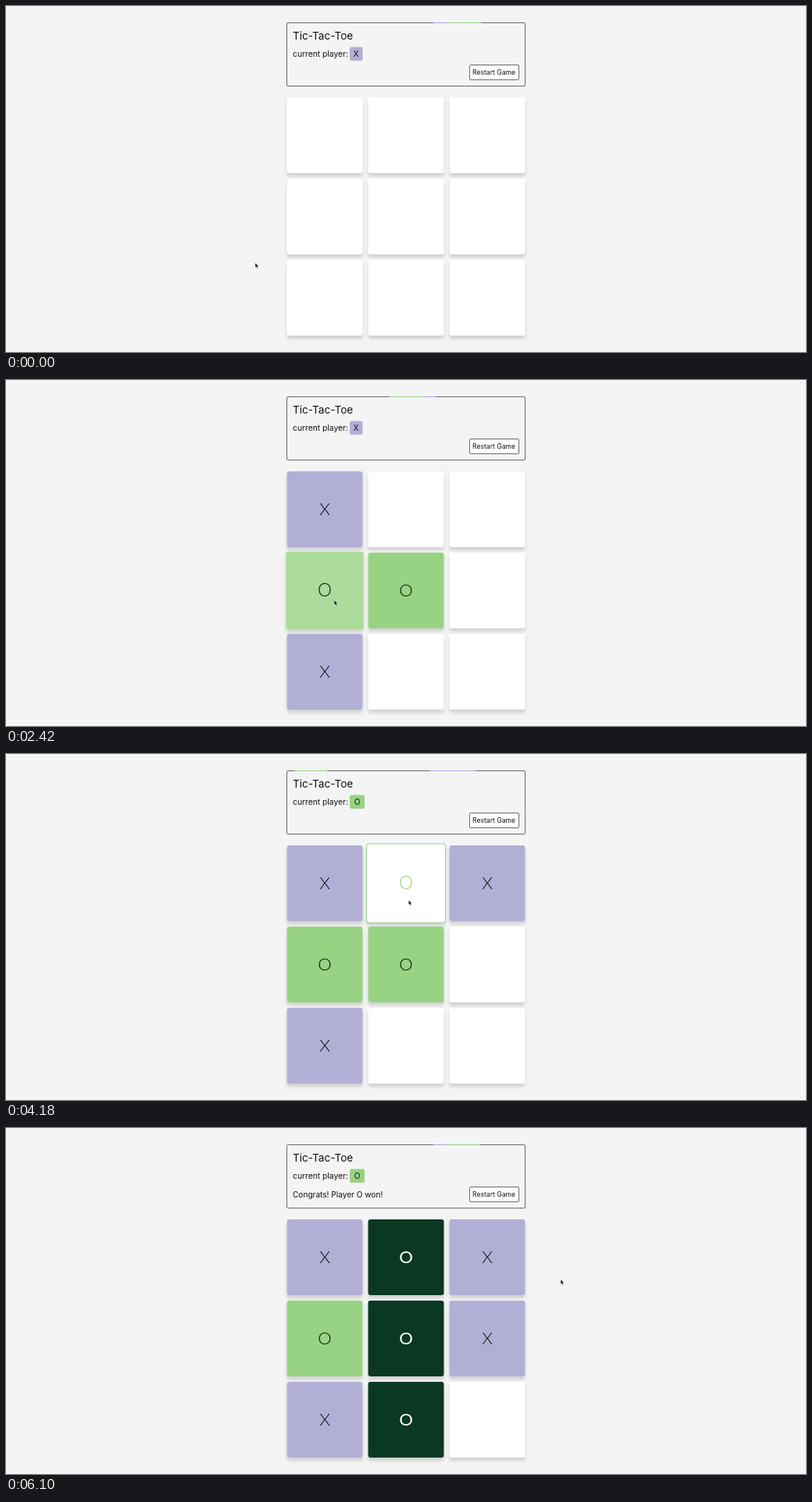
Write an HTML page that moves like this. It is 1024 by 443 pixels and loops after 6.12 s.

```html
<!DOCTYPE html>
<html lang="en">
<head>
<meta charset="utf-8">
<title>Tic-Tac-Toe</title>
<style>
html, body { margin: 0; width: 100%; height: 100%; overflow: hidden; background: #f4f4f4; }
svg { display: block; width: 100%; height: 100%; }
text { font-family: Inter, "Open Sans", sans-serif; fill: #111; }
.panel { fill: none; stroke: #6b6b6b; }
.button { fill: #fff; stroke: #6b6b6b; }
.base { filter: drop-shadow(0 4px 2px rgba(0, 0, 0, .15)); }
.mark { font-family: Lato, sans-serif; font-size: 22px; font-weight: 300; text-anchor: middle; }
</style>
</head>
<body>
<svg viewBox="0 0 1024 443">
  <rect class="panel" x="359.5" y="21.5" width="305" height="81" rx="1.5"/>
  <rect id="violet" y="21" width="60" height="1" fill="#aaa6e0"/>
  <rect id="lime" y="21" width="42" height="1" fill="#97d383"/>
  <text x="367" y="43" font-size="13.6">Tic-Tac-Toe</text>
  <text x="367" y="65" font-size="10.3">current player:</text>
  <rect id="badge" x="440" y="52.5" height="17.5" rx="2"/>
  <text id="player" y="65" font-size="10" text-anchor="middle"></text>
  <text id="message" x="367" y="89" font-size="10.1">Congrats! Player O won!</text>
  <rect class="button" x="593.5" y="75.5" width="63" height="19" rx="1.5"/>
  <text x="597" y="88.3" font-size="8.6">Restart Game</text>
  <g id="board"></g>
  <path id="cursor" d="M0 0V6L1.4 4.8L2.4 7L3.5 6.5L2.6 4.3H4.4Z" fill="#111" stroke="#fff" stroke-width=".4"/>
</svg>
<script>
const LOOP = 6120, FADE = 200, SAMPLES = 20, SIZE = 97, PITCH = 104;
const COLORS = { X: '#b2afd6', O: '#97d383' };
const WIN_COLOR = '#0a3823', WIN_COLUMN = 1;

// Stops of the pointer: time, x, y
const STOPS = [
  [40, 319, 329], [500, 398, 195], [1040, 500, 242], [1860, 406, 400], [2350, 406, 270],
  [2640, 500, 350], [2860, 600, 317], [3180, 604, 350], [3560, 606, 185], [3700, 588, 215],
  [4200, 515, 187], [4440, 585, 265], [4660, 602, 326], [5200, 600, 280], [5830, 520, 392],
  [6100, 710, 194]
];
// Each click marks the cell under the pointer; X begins
const CLICKS = [500, 850, 1550, 2350, 3560, 4200, 5200, 5830];
const WIN_TIME = CLICKS[CLICKS.length - 1];

const byId = id => document.getElementById(id);
const set = (node, attrs) => {
  for (const name in attrs) node.setAttribute(name, attrs[name]);
  return node;
};
const add = (parent, tag, attrs) =>
  parent.appendChild(set(document.createElementNS('http://www.w3.org/2000/svg', tag), attrs));
const clamp = value => Math.min(1, Math.max(0, value));
const ease = part => part * part * (3 - 2 * part);

function pointerAt(time) {
  const last = STOPS.length - 1;
  const next = STOPS.findIndex(stop => stop[0] > time);
  const to = STOPS[next < 0 ? last : next];
  const from = STOPS[next < 0 ? last - 1 : Math.max(0, next - 1)];
  const part = ease(clamp((time - from[0]) / (to[0] - from[0] || 1)));
  return [1, 2].map(i => from[i] + (to[i] - from[i]) * part);
}

const inside = (cell, [x, y]) =>
  Math.abs(x - cell.cx) < SIZE / 2 && Math.abs(y - cell.cy) < SIZE / 2;

function makeCell(index) {
  const column = index % 3;
  const cx = 408 + column * PITCH, cy = 165.5 + Math.floor(index / 3) * PITCH;
  const box = { x: -SIZE / 2, y: -SIZE / 2, width: SIZE, height: SIZE, rx: 3 };
  const group = add(byId('board'), 'g', {});
  const turn = CLICKS.findIndex(time => inside({ cx, cy }, pointerAt(time)));
  add(group, 'rect', { ...box, class: 'base', fill: '#fff' });
  return {
    cx, cy, column, group,
    owner: turn % 2 ? 'O' : 'X',
    taken: turn < 0 ? Infinity : CLICKS[turn],
    fill: add(group, 'rect', box),
    edge: add(group, 'rect', { ...box, fill: 'none' }),
    mark: add(group, 'text', { y: 7.5, class: 'mark' })
  };
}
const cells = Array.from({ length: 9 }, (_, index) => makeCell(index));

// Eased share of the last FADE ms during which the empty cell was under the pointer
function hoverAmount(cell, time) {
  let hits = 0;
  for (let i = 0; i < SAMPLES; i++) {
    const moment = time - i * FADE / SAMPLES;
    if (moment < cell.taken && inside(cell, pointerAt(moment))) hits++;
  }
  return ease(hits / SAMPLES);
}

function drawCell(cell, time, player) {
  const taken = time >= cell.taken;
  const won = time >= WIN_TIME && cell.owner === 'O' && cell.column === WIN_COLUMN;
  const hover = hoverAmount(cell, time);
  const owner = taken ? cell.owner : player;
  set(cell.group, { transform: `translate(${cell.cx} ${cell.cy}) scale(${1 + .04 * hover})` });
  set(cell.fill, {
    fill: won ? WIN_COLOR : COLORS[owner],
    opacity: taken ? clamp((time - cell.taken + 40) / 140) : 0
  });
  set(cell.edge, { stroke: COLORS[owner], opacity: taken ? 0 : hover });
  cell.mark.textContent = owner;
  cell.mark.style.fill = won ? '#fff' : taken ? '#111' : COLORS[owner];
  cell.mark.style.fontWeight = won ? 400 : 300;
  cell.mark.style.opacity = taken ? 1 : clamp(hover * 2 - 1);
}

// A tinted stretch swaying along the panel's top edge
function sway(id, middle, reach, cycles, delay, time) {
  set(byId(id), { x: middle + reach * Math.cos(2 * Math.PI * cycles * (time - delay) / LOOP) });
}

function draw(time) {
  const played = CLICKS.filter(click => click <= time).length;
  const player = played % 2 || played === CLICKS.length ? 'O' : 'X';
  const badgeWidth = player === 'X' ? 16.5 : 19;
  set(byId('badge'), { width: badgeWidth, fill: COLORS[player] });
  set(byId('player'), { x: 440 + badgeWidth / 2 }).textContent = player;
  set(byId('message'), { opacity: time >= WIN_TIME ? 1 : 0 });
  sway('violet', 455, 92, 3, 0, time);
  sway('lime', 491, 125, 1, 900, time);
  cells.forEach(cell => drawCell(cell, time, player));
  set(byId('cursor'), { transform: `translate(${pointerAt(time)})` });
}

const start = performance.now();
function tick(now) {
  draw(Math.max(0, now - start) % LOOP);
  requestAnimationFrame(tick);
}
draw(0);
requestAnimationFrame(tick);
</script>
</body>
</html>
```
